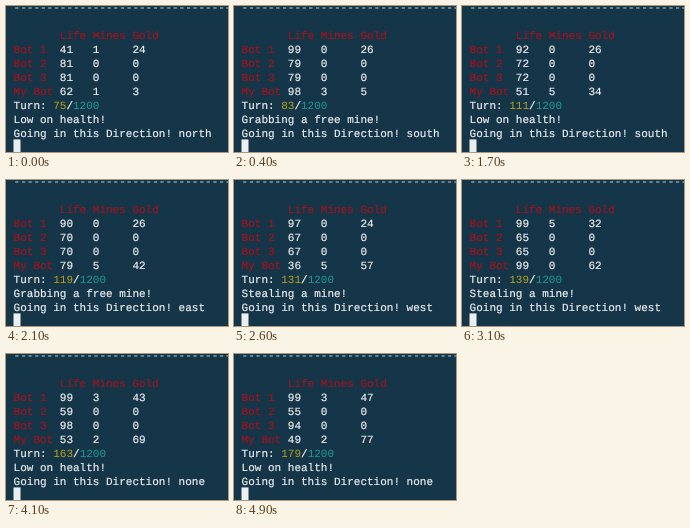
Recreate the animation shown at these times as an HTML page. Size 222 by 146 pixels, loop 5000 ms.

```html
<!DOCTYPE html>
<html lang="en">
<head>
<meta charset="utf-8">
<title>Bot arena log</title>
<style>
  html, body { margin: 0; width: 100%; height: 100%; overflow: hidden; background: #153549; }
  svg { display: block; width: 222px; height: 146px; }
  text {
    font: 11px "Liberation Mono", "Courier New", monospace;
    fill: #eceff0; stroke: #eceff0; stroke-width: 0.2px;
    white-space: pre; text-rendering: geometricPrecision;
  }
  .red { fill: #a0141d; stroke: #a0141d; }
  .turn { fill: #b8a41c; stroke: none; }
  .total { fill: #229a94; stroke: none; }
  .rule { fill: #b9c8d0; stroke: #b9c8d0; }
</style>
</head>
<body>
<svg id="stage" viewBox="0 0 222 146">
  <rect width="222" height="146" fill="#153549"/>
</svg>
<script>
const LOOP = 5000, TICK = 100, LAST = 26;
const LEFT = 7.6, CELL = 6.6, TOP = 5, LINE = 14;
const COLS = [7, 12, 18];
const stage = document.getElementById("stage");

function add(parent, name, attrs, content = "") {
  const node = document.createElementNS("http://www.w3.org/2000/svg", name);
  for (const key in attrs) node.setAttribute(key, attrs[key]);
  node.textContent = content;
  return parent.appendChild(node);
}

const put = (col, row, content = "", cls = "") =>
  add(stage, "text", { x: LEFT + col * CELL, y: TOP + row * LINE, class: cls }, content);

put(0, 0, "-".repeat(33), "rule");
["Life", "Mines", "Gold"].forEach((label, i) => put(COLS[i], 2, label, "red"));
const cells = ["Bot 1", "Bot 2", "Bot 3", "My Bot"].map((label, i) => {
  put(0, 3 + i, label, "red");
  return COLS.map(col => put(col, 3 + i));
});
const turnLine = put(0, 7, "Turn: ");
const turnNo = add(turnLine, "tspan", { class: "turn" });
add(turnLine, "tspan", {}, "/");
add(turnLine, "tspan", { class: "total" }, "1200");
const message = put(0, 8);
const heading = put(0, 9);
add(stage, "rect", { x: 7.5, y: 133.4, width: 7, height: 12.6, fill: "#eceff0" });

// One letter per turn: d drink, m capture a mine, s steal a mine,
// h hit the rival, k kill the rival, x respawn, g head for a free mine
const myPlan = "dk.m...m..dg.....s..s.....";
const rivalPlan = "m" + ".".repeat(9) + "hdhhk" + "d".repeat(11);
const route = "nssnwseeesnewewwwnwswn-----";
const directions = { n: "north", s: "south", e: "east", w: "west", "-": "none" };
const goals = { d: "Low on health!", m: "Grabbing a free mine!", s: "Stealing a mine!" };
goals.g = goals.m;

const bot = (life, mines, gold, plan = "") => ({ life, mines, gold, plan });

const actions = {
  d(me) { me.life = Math.min(100, me.life + 50); me.gold -= 2; },
  m(me) { me.life -= 20; me.mines++; },
  s(me, rival) { actions.m(me); rival.mines--; },
  h(me, rival) { rival.life -= 20; },
  k(me, rival) { me.mines += rival.mines; actions.x(rival); },
  x(me) { me.life = 100; me.mines = 0; }
};

// Play the whole match once and keep the score after every step
function play() {
  const bots = [
    bot(41, 1, 24, rivalPlan), bot(81, 0, 0),
    bot(81, 0, 0, ".".repeat(20) + "x"), bot(62, 1, 3, myPlan)
  ];
  const [first, second, third, mine] = bots;
  const scores = () => bots.map(b => [b.life, b.mines, b.gold]);
  const history = [scores()];
  for (let turn = 0; turn < LAST; turn++) {
    for (const b of [mine, first, second, third]) {
      const act = actions[b.plan[turn]];
      if (act) act(b, b === mine ? first : mine);
      b.life--;
      b.gold += b.mines;
    }
    history.push(scores());
  }
  return history;
}
const history = play();

// The log names the next goal still ahead
function goalAt(step) {
  const next = [...myPlan.slice(step)].find(letter => goals[letter]);
  return goals[next || "d"];
}

// Game steps arrive every 187 ms and show on the nearest display tick
function stepAt(ms) {
  const tick = Math.floor(ms / TICK);
  let step = 0;
  while (step < LAST && Math.round((187 * (step + 1) + 6) / TICK) <= tick) step++;
  return step;
}

let shown = -1;
function draw(ms) {
  const step = stepAt(ms);
  if (step === shown) return;
  shown = step;
  history[step].forEach((row, i) =>
    row.forEach((value, j) => { cells[i][j].textContent = value; }));
  turnNo.textContent = 75 + 4 * step;
  message.textContent = goalAt(step);
  heading.textContent = "Going in this Direction! " + directions[route[step]];
}

const begin = performance.now();
function frame() {
  draw((performance.now() - begin) % LOOP);
  requestAnimationFrame(frame);
}
draw(0);
requestAnimationFrame(frame);
</script>
</body>
</html>
```
